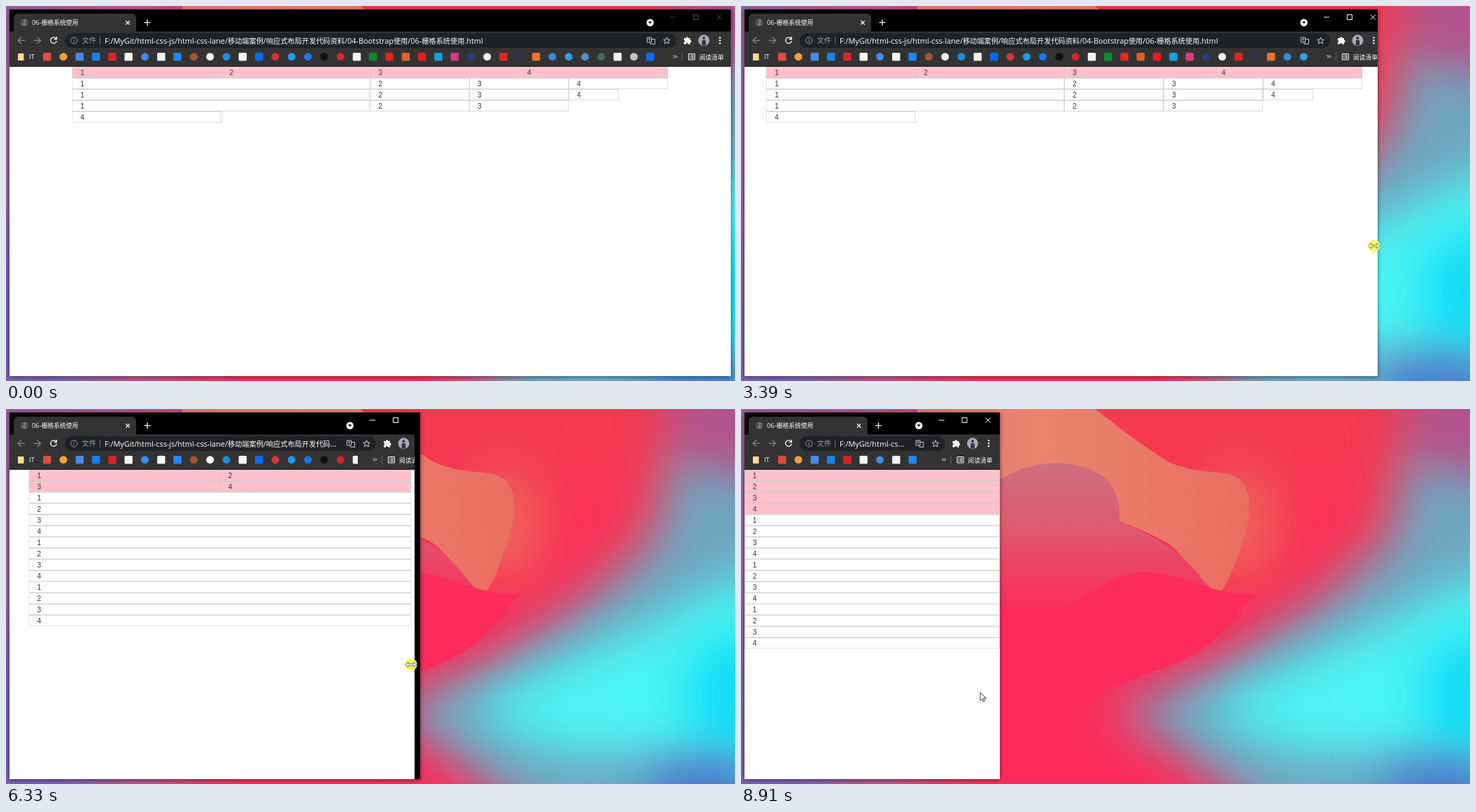
Animation of 1042x537 px, one loop 8.96 s. Source, as an HTML page:

```html
<!DOCTYPE html>
<html lang="zh">
<head>
<meta charset="utf-8">
<title>栅格系统</title>
<style>
html, body { margin: 0; width: 100%; height: 100%; overflow: hidden; }
body { position: relative; background: #f83358; font-family: "Open Sans", "Noto Sans CJK SC", "Noto Sans CJK", sans-serif; }
body > *, #paint > * { position: absolute; }
svg { display: block; overflow: hidden; }
#wall, #pointer { left: 0; top: 0; }
#win { left: 5px; top: 5px; height: 525px; background: #000; box-shadow: 0 1px 6px rgba(0,0,0,.55); }
#paint { position: relative; height: 100%; overflow: hidden; background: #fff; }
#chrome { left: -5px; top: -5px; }
#url { left: 136px; top: 36px; height: 17px; line-height: 17px; font-size: 10.9px; color: #fff;
  white-space: nowrap; overflow: hidden; text-overflow: ellipsis; }
#url i { font-style: normal; font-size: 10.2px; }
#page { left: 0; top: 81.5px; transform: scale(.728); transform-origin: 0 0;
  font: 14px/20px "Liberation Sans", Arial, sans-serif; color: #333; }
#grid { position: relative; }
.row { overflow: hidden; }
.row:first-child { background: #ffc0cb; }
.cell { float: left; box-sizing: border-box; height: 22px; padding: 0 15px; border: 1px solid #ccc; }
.line { fill: none; stroke: #fff; }
</style>
</head>
<body>
<svg id="wall" width="1042" height="537">
  <defs>
    <filter id="soft" x="-80%" y="-80%" width="260%" height="260%" color-interpolation-filters="sRGB"><feGaussianBlur stdDeviation="34"/></filter>
    <linearGradient id="red" x2="0" y2="1"><stop stop-color="#f43b50"/><stop offset=".55" stop-color="#fb2e58"/><stop offset="1" stop-color="#fd2b5b"/></linearGradient>
    <linearGradient id="salmon"><stop stop-color="#d67683"/><stop offset=".6" stop-color="#e8836d"/><stop offset="1" stop-color="#ea6d61"/></linearGradient>
    <linearGradient id="mauve" x2="0" y2="1"><stop stop-color="#cd6f80"/><stop offset=".45" stop-color="#e0586f"/><stop offset="1" stop-color="#fd2b5b"/></linearGradient>
    <linearGradient id="side"><stop stop-color="#9a609f"/><stop offset=".6" stop-color="#b8568c"/><stop offset="1" stop-color="#fd2b5b"/></linearGradient>
  </defs>
  <rect width="1042" height="537" fill="url(#red)"/>
  <ellipse cx="712" cy="165" rx="52" ry="85" fill="#ee665c" filter="url(#soft)"/>
  <path d="M535 432 690 365 840 265 925 185 955 50 1180 20V640H800L640 500Z" fill="#70a6c0" filter="url(#soft)"/>
  <ellipse cx="1050" cy="0" rx="105" ry="95" fill="#b0548f" filter="url(#soft)"/>
  <path d="M650 432 800 360 930 300 1040 240H1180V500H950L780 490Z" fill="#4cf5f3" filter="url(#soft)"/>
  <ellipse cx="1060" cy="410" rx="90" ry="90" fill="#12dbf6" filter="url(#soft)"/>
  <ellipse cx="1000" cy="550" rx="90" ry="48" fill="#4478d2" filter="url(#soft)"/>
  <path d="M0 0H506C545 30 570 50 610 75C650 95 690 85 712 100C735 120 728 165 712 205C700 240 692 255 684 263C660 255 640 215 610 192C580 175 550 165 541 160L252 160Z" fill="url(#salmon)"/>
  <path d="M252 140 370 100C410 78 450 72 490 83C530 95 543 125 541 160C580 178 640 205 668 258V290H252Z" fill="url(#mauve)"/>
  <path d="M200 290 468 282C500 260 540 235 580 233C620 236 650 253 690 261Q715 267 735 265C710 290 690 325 650 350C600 380 540 385 505 415C488 430 480 445 482 460L470 537H200Z" fill="#fd2b5b"/>
  <path d="M0 0H252V140L340 250V537H0Z" fill="url(#side)"/>
  <ellipse cy="537" rx="130" ry="230" fill="#6a62bc" opacity=".7" filter="url(#soft)"/>
</svg>

<div id="win"><div id="paint">
  <svg id="chrome" width="1042" height="87" font-size="9.4">
    <rect width="1042" height="87"/>
    <rect id="tab" x="11" y="11" height="40" rx="6" fill="#333"/>
    <rect y="36.5" width="1042" height="50" fill="#333"/>
    <rect id="pill" x="84" y="39" height="21" rx="10.5" fill="#202124"/>
    <circle cx="26" cy="23.7" r="5" fill="#75797d"/>
    <path d="M22 21l3-1 1 2-2 2 1 3-3-2zM28 21l2 1v3l-2 1z" fill="#444"/>
    <text x="37" y="27.3" fill="#fff">06-<tspan font-size="8.74">栅格系统使用</tspan></text>
    <g id="tabEnd" class="line" stroke-width="1.3"><path d="M-14.7 21.2l5.4 5.4m0-5.4l-5.4 5.4"/><path d="M11.5 23.7h9m-4.5-4.5v9"/></g>
    <g class="line" stroke-width="1.3">
      <path d="M27 49.3H17m4.7-4.5L17 49.3l4.7 4.5M39.5 49.3h10m-4.7-4.5 4.7 4.5-4.7 4.5" stroke="#85868c"/>
      <path d="M71.5 46.5A4.3 4.3 0 1 0 72.3 50M72.3 44v3.5h-3.5"/>
      <g stroke="#9aa0a6" stroke-width="1"><circle cx="97.2" cy="49.5" r="4.6"/><path d="M97.2 48.8v3.2m0-5v1"/><path d="M134.5 44v11" stroke="#777"/></g>
    </g>
    <text x="108.5" y="53.2" font-size="10.2" fill="#9aa0a6">文件</text>
    <path d="M17 68h8.5v10H17z" fill="#fbdc92"/>
    <text x="33" y="76.3" fill="#fff">IT</text>
    <g id="marks"></g>
    <g id="right">
      <rect x="-104" y="62" width="104" height="23" fill="#333"/>
      <circle cx="-115.3" cy="23.7" r="5.2" fill="#fff"/><path d="M-118 22.3h5.4l-2.7 3.3z"/>
      <path id="buttons" class="line" d="M-87 16h8M-53.5 12.5h7v7h-7zM-20 12.5l7 7m0-7l-7 7"/>
      <g class="line">
        <path d="M-119.5 45h6v7h-6zM-113 47.5h4.5v7h-6l-1-2.5M-118 47.2h3m-1.5 0v3" stroke="#c4c6ca"/>
        <path transform="translate(-91.5 49.7)" d="M0-4.8 1.4-1.6 4.7-1.4 2.2.8 3 4.2 0 2.4-3 4.2-2.2.8-4.7-1.4-1.4-1.6Z" stroke="#d5d6d8"/>
        <path d="M-82 70.5l2 2-2 2m3-4 2 2-2 2"/>
        <path d="M-69.5 67v12" stroke="#666"/>
        <path d="M-60.5 68.5h9v8.5h-9zM-59 70.7h1m1 0h4m-6 2h1m1 0h4m-6 2h1m1 0h4"/>
      </g>
      <path d="M-67 46h3a1.7 1.7 0 0 1 3.4 0h2.6v2.8a1.7 1.7 0 0 1 0 3.4v2.5h-2.8a1.7 1.7 0 0 0-3.4 0H-67v-2.8a1.7 1.7 0 0 0 0-3.2z" fill="#fff"/>
      <circle cx="-38.5" cy="49.3" r="8" fill="#aaa9b6"/>
      <circle cx="-38.5" cy="46" r="2" fill="#303340"/><path d="M-41 49h5l.5 7.5h-6z" fill="#303340"/>
      <g fill="#fff"><circle cx="-15.5" cy="45.3" r="1.2"/><circle cx="-15.5" cy="49.3" r="1.2"/><circle cx="-15.5" cy="53.3" r="1.2"/>
      <text x="-45" y="76.5" font-size="8.74">阅读清单</text></g>
    </g>
  </svg>
  <div id="url">F:/MyGit/html-css-js/html-css-lane/<i>移动端案例</i>/<i>响应式布局开发代码资料</i>/04-Bootstrap<i>使用</i>/06-<i>栅格系统使用</i>.html</div>
  <div id="page"><div id="grid"></div></div>
</div></div>

<svg id="pointer" width="1042" height="537">
  <g id="resize">
    <circle id="press" r="8.7" fill="#fbf76c"/>
    <path d="M-8 0l4-4v2.7h8V-4l4 4-4 4V1.3h-8V4z" fill="#fff" fill-opacity=".55" stroke="#6d6a35" stroke-width=".9"/>
  </g>
  <path id="arrow" d="M0 0V11.5L2.7 9 4.6 13 6.4 12.2 4.6 8.3H8.3Z" fill="#fff" stroke="#222" stroke-width=".9"/>
</svg>

<script>
const LOOP = 8960, SCALE = 0.728, LEFT = 5;
const $ = id => document.getElementById(id);

// Column spans per row on large screens
const spans = [[3, 3, 3, 3], [6, 2, 2, 2], [6, 2, 2, 1], [6, 2, 2, 3]];
$('grid').innerHTML = spans.map(row =>
  `<div class="row">${row.map((_, i) => `<div class="cell">${i + 1}</div>`).join('')}</div>`).join('');
const rows = [...document.querySelectorAll('.row')].map(row => [...row.children]);

// Bookmarks: a leading "o" means a round one
const colours = `#e04a3f o#f0a040 #4a87e8 #1683ea #d8232a #f4f4f4 o#3d8bea #f4f4f4 #1f86f2 o#a4552e
  o#f4f4f4 o#1a8fe0 #f4f4f4 #0a6cf0 o#d8343a o#1d9bf0 o#1877f2 o#151010 o#d8262c #f4f4f4
  #128a2c #e3281f #d9622b #f01c1c #16a0e0 #d83a80 o#26407a o#f4f4f4 #e02424 o#2c3148
  #e8742a o#2f8de0 o#2aa0ea o#4f8fd0 o#44695f #f4f4f4 o#c4c4c4 #0d6ef0`.split(/\s+/);
const markX = i => 58.7 + 23.3 * i;
$('marks').innerHTML = colours.map((name, i) => {
  const round = name[0] === 'o', size = round ? 11 : 11.5;
  return `<rect x="${markX(i) - size / 2}" y="${72.7 - size / 2}" width="${size}" height="${size}"
    rx="${round ? size / 2 : 1.5}" fill="${name.replace('o', '')}"/>`;
}).join('');
const marks = [...$('marks').children];

// time, pointer x, pointer y, painted edge, window edge, layout edge
const keys = [
  [2090, 1035, 333.5, 1036, 1036, 1036],
  [2960, 949, 340, 957, 957, 973],
  [3390, 905, 343.5, 910, 910, 920],
  [3880, 864, 347, 871, 871, 889],
  [4350, 801, 350.5, 807, 808, 816.5],
  [4770, 722, 355, 728, 730, 740],
  [5720, 637, 361, 643, 648, 657],
  [6330, 579, 366, 584, 592, 607],
  [6610, 557, 369, 563, 570, 579],
  [7520, 467, 380, 477, 483, 487],
  [7730, 443.5, 382, 456, 460, 461],
  [8440, 354, 402, 370, 370, 378],
  [8540, 346, 404, 370, 370, 369.5],
  [8700, 342, 406, 370, 370, 369.5]
];

function sample(t) {
  const next = keys.findIndex(key => key[0] > t);
  if (next === 0) return keys[0];
  if (next < 0) return keys[keys.length - 1];
  const a = keys[next - 1], b = keys[next], k = (t - a[0]) / (b[0] - a[0]);
  return a.map((v, i) => v + (b[i] - v) * k);
}

function layoutGrid(width) {
  const size = [768, 992, 1200].filter(limit => width >= limit).length;
  const box = [width, 750, 970, 1170][size];
  $('grid').style.width = box + 'px';
  $('grid').style.left = (width - box) / 2 + 'px';
  rows.forEach((cells, r) => cells.forEach((cell, c) => {
    const span = size === 3 ? spans[r][c] : r ? 12 : [12, 6, 4][size];
    cell.style.width = span / 12 * 100 + '%';
  }));
}

const show = (el, on) => el.setAttribute('visibility', on ? 'visible' : 'hidden');
const move = (el, x, y = 0) => el.setAttribute('transform', `translate(${x} ${y})`);

function drawPointer(t, x, y) {
  const entering = t >= 350 && t < 750, resizing = t >= 1160 && t < 8490;
  show($('resize'), resizing);
  show($('press'), resizing && t >= 1560);
  show($('arrow'), entering || t >= 8490);
  move($('resize'), x, y);
  const k = (t - 350) / 400;
  if (entering) move($('arrow'), 716 + 311 * k, 530 - 180 * k);
  else move($('arrow'), x, y);
}

function draw(now) {
  const t = now % LOOP;
  const [, x, y, paint, edge, layout] = sample(t);
  const tabEnd = Math.min(186, layout - 189);
  $('win').style.width = edge - LEFT + 'px';
  $('paint').style.width = paint - LEFT + 'px';
  $('tab').setAttribute('width', tabEnd - 11);
  move($('tabEnd'), tabEnd);
  $('pill').setAttribute('width', layout - 78 - 84);
  $('url').style.width = layout - 132 - 141 + 'px';
  $('buttons').style.stroke = t < 1560 ? '#4a4a4a' : '#fff';
  move($('right'), layout);
  marks.forEach((mark, i) => show(mark, markX(i) < layout - 104));
  const width = (layout - LEFT) / SCALE;
  $('page').style.width = width + 'px';
  layoutGrid(width);
  drawPointer(t, x, y);
}

function tick() {
  draw(performance.now());
  requestAnimationFrame(tick);
}
tick();
</script>
</body>
</html>
```
